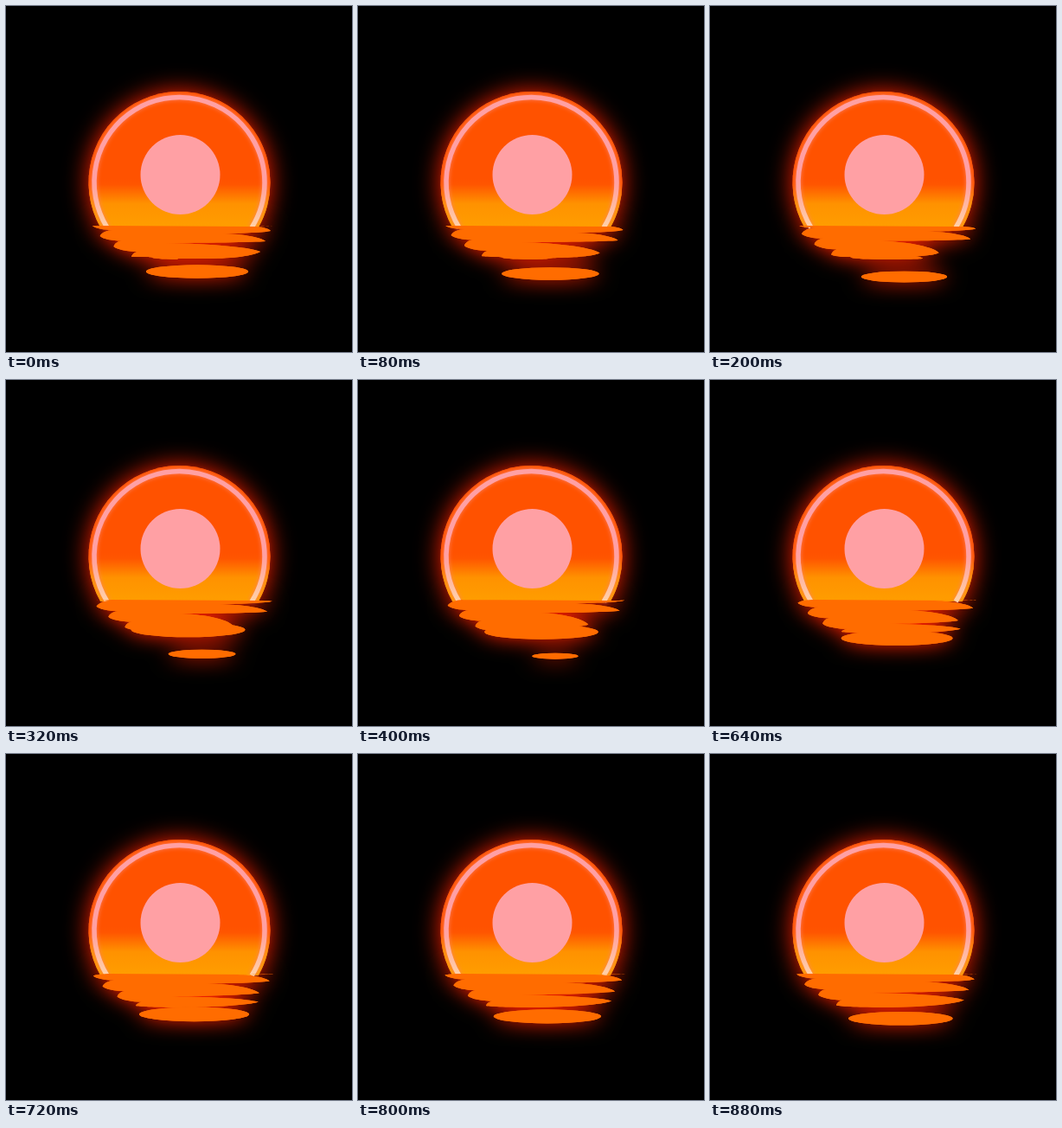
These frames come from a looping animation (400 px wide and 400 px high, 920 ms). An HTML page with a canvas:

```html
<!DOCTYPE html>
<html>
<head>
<meta charset="utf-8">
<style>
  html, body { margin: 0; width: 100%; height: 100%; overflow: hidden; background: #000; }
  canvas { display: block; width: 400px; height: 400px; }
</style>
</head>
<body>
<canvas id="stage" width="400" height="400"></canvas>
<script>
const ctx = document.getElementById('stage').getContext('2d');
const LOOP = 920, STEP = 40, HORIZON = 255, WAVES = 5;
const SUN_X = 200.5, SUN_Y = 204;
const WATER = '#ff6c00';
const { min, max, sin, sqrt, PI } = Math;

// Waves rise to the horizon, 12 px per loop; age is counted in loops.
// Each has a tip and a notch on both sides.
function rightTip(age) {
  const swell = age > 1 && age < 2 ? sin(PI * (age - 1) ** .6) : 0;
  const young = max(0, 1 - age);
  return [
    288 + 6 * min(age, 3.5) - 90 * young ** 3 - 34 * swell ** 2,
    min(292, max(254, 296 - 12 * age + 4 * swell))
  ];
}

function rightNotch(age) {
  if (age < 1) {
    const young = 1 - age;
    return [min(235, 173 + 190 * young ** 2), 274 + 18 * young ** .7];
  }
  const opened = min(246, 173 + 73 * (age - 1));
  return [min(290, opened + 100 * max(0, age - 2.6)), max(HORIZON, 285 - 11 * age)];
}

function leftTip(age) {
  const depth = max(0, (4 - age) / 3);
  return [100 + 45 * depth ** 1.5 + 15 * max(0, age - 4), min(291, max(254, 302 - 12 * age))];
}

function leftNotch(age) {
  const depth = max(0, (4 - age) / 3);
  return [121 + 32 * min(1.1, depth) ** 2.2, min(290, max(254, 296.5 - 12.5 * age))];
}

// Rounded at the tip, level at the notch.
function edge(path, from, to, toTip) {
  const [tip, notch] = toTip ? [to, from] : [from, to];
  const dx = notch[0] - tip[0], dy = notch[1] - tip[1];
  const nearTip = [tip[0] + dx * .1, tip[1] + dy * .55];
  const nearNotch = [notch[0] - dx * .45, notch[1]];
  const controls = toTip ? [nearNotch, nearTip] : [nearTip, nearNotch];
  path.bezierCurveTo(...controls[0], ...controls[1], ...to);
}

// A patch that breaks off below, sinks and shrinks away.
function addPatch(path, age) {
  if (age < .3 || age >= 1.5) return;
  const x = 205 + 16 * age, y = 279 + 28 * age;
  const half = 66 * sqrt(1 - (age / 1.5) ** 4);
  path.moveTo(x + half, y);
  path.ellipse(x, y, half, half * .13, 0, 0, 2 * PI);
}

function waterPath(phase) {
  const path = new Path2D(), points = [];
  for (let k = WAVES - 1; k >= 0; k--) points.push(rightNotch(phase + k), rightTip(phase + k));
  points.push([200, 293]);
  for (let k = 0; k < WAVES; k++) points.push(leftTip(phase + k), leftNotch(phase + k));
  path.moveTo(118, HORIZON - 1);
  path.lineTo(...points[0]);
  for (let i = 1; i < points.length; i++) edge(path, points[i - 1], points[i], i % 2 === 1);
  path.closePath();
  addPatch(path, phase);
  addPatch(path, phase + 1);
  return path;
}

function verticalGradient(...stops) {
  const gradient = ctx.createLinearGradient(0, 200, 0, HORIZON);
  stops.forEach(([at, color]) => gradient.addColorStop(at, color));
  return gradient;
}

function cappedArc(radius) {
  const angle = Math.asin((HORIZON + 1 - SUN_Y) / radius), path = new Path2D();
  path.arc(SUN_X, SUN_Y, radius, PI - angle, angle);
  return path;
}

const sunFill = verticalGradient([0, '#ff5200'], [.12, '#ff5600'], [.52, '#ff9200'], [1, '#ff9d00']);
const rimFill = verticalGradient([0, '#ffa0a4'], [.2, '#ffa5a0'], [1, '#ffd0a8']);
const sun = cappedArc(105), rim = cappedArc(98.5);
const disc = new Path2D();
disc.arc(201.5, 195, 46, 0, 2 * PI);

function fill(path, color, glow = 0) {
  ctx.shadowColor = '#ff2000';
  ctx.shadowBlur = glow;
  ctx.fillStyle = color;
  ctx.fill(path);
}

function strokeRim() {
  ctx.shadowColor = '#ff8060';
  ctx.shadowBlur = 5;
  ctx.strokeStyle = rimFill;
  ctx.lineWidth = 5.5;
  ctx.stroke(rim);
}

function draw() {
  const time = Math.floor(performance.now() % LOOP / STEP) * STEP;
  const water = waterPath(time / LOOP);
  ctx.shadowBlur = 0;
  ctx.fillStyle = '#000';
  ctx.fillRect(0, 0, 400, 400);
  fill(sun, sunFill, 28);
  fill(water, WATER, 24);
  fill(sun, sunFill);
  strokeRim();
  fill(disc, '#ffa0a4');
  fill(water, WATER);
  requestAnimationFrame(draw);
}
draw();
</script>
</body>
</html>
```
